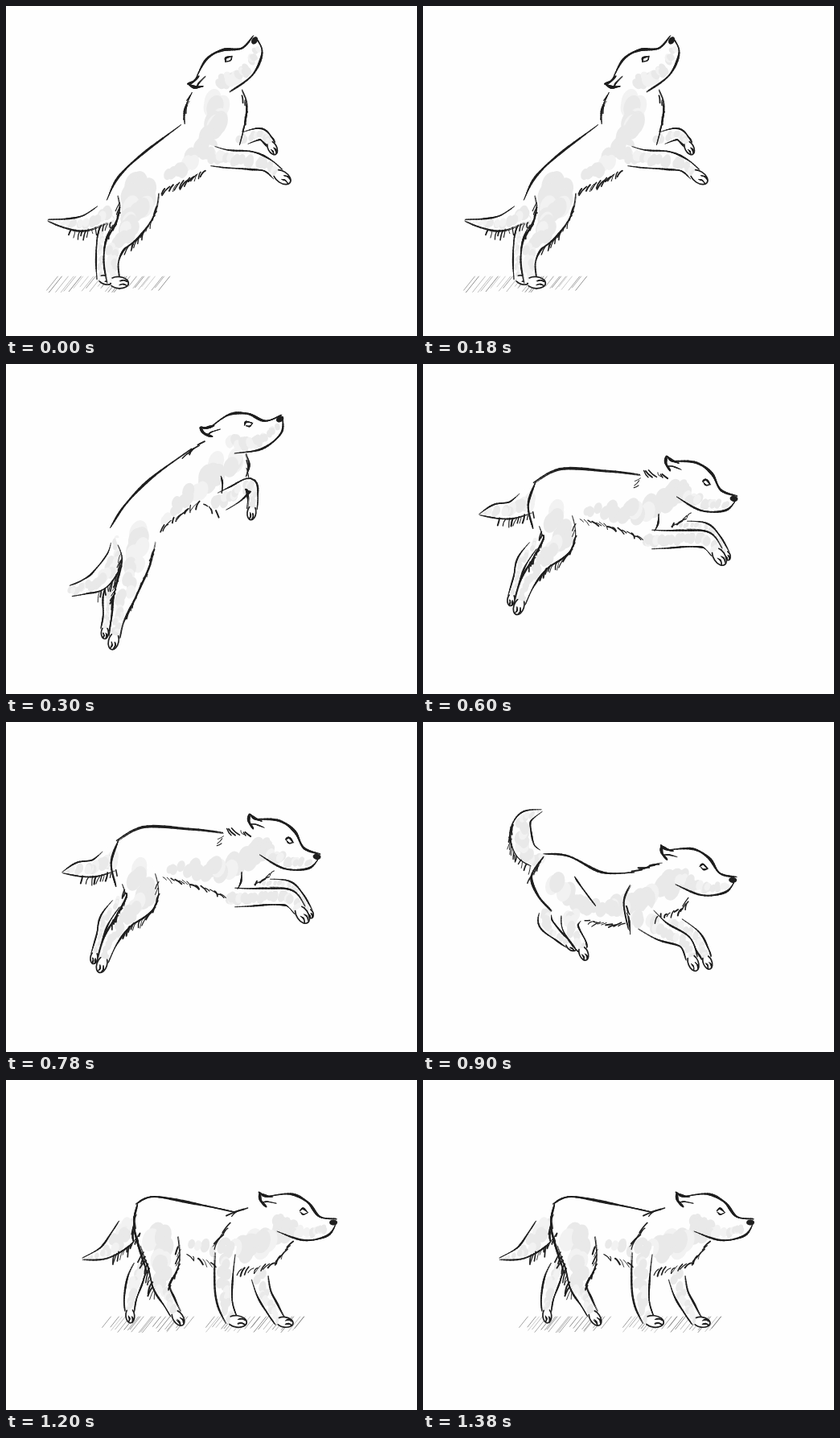
Recreate the animation shown at these times as an HTML page with a canvas. Size 511x410 px, loop 1.5 s.

```html
<!DOCTYPE html>
<html lang="en">
<head>
<meta charset="utf-8">
<title>Leaping wolf</title>
<style>
html, body { margin: 0; width: 100%; height: 100%; overflow: hidden; background: #fefefe; }
canvas { display: block; }
</style>
</head>
<body>
<canvas id="stage" width="511" height="410"></canvas>
<script>
const ctx = document.getElementById('stage').getContext('2d');
const INK = '#1f1f1f', PAPER = '#fefefe', HOLD = 300;

let seed = 1;
const rand = () => (seed = seed * 16807 % 2147483647) / 2147483647;
const jitter = a => (rand() * 2 - 1) * a;

// Smooth curve through "x,y x,y" or, with a half width, "x,y,r x,y,r"
function curve(text) {
  const p = text.split(' ').map(q => q.split(',').map(Number));
  const at = i => p[Math.max(0, Math.min(p.length - 1, i))];
  const out = [];
  for (let i = 0; i < p.length - 1; i++) {
    for (let t = 0; t < 1; t += 0.125) {
      out.push(p[0].map((_, c) => {
        const [a, b, d, e] = [at(i - 1)[c], at(i)[c], at(i + 1)[c], at(i + 2)[c]];
        return b + t * (d - a + t * (2 * a - 5 * b + 4 * d - e + t * (3 * b - a - 3 * d + e))) / 2;
      }));
    }
  }
  return [...out, at(p.length)];
}

const part = (p, from, to) => p.slice(Math.floor(p.length * from), Math.ceil(p.length * to));

// Two uneven passes of a brush that thins out at both ends
function ink(width, p) {
  ctx.strokeStyle = INK;
  for (const share of [0.85, 0.45]) {
    const ox = jitter(0.7), oy = jitter(0.7), wave = rand() * 6;
    for (let i = 1; i < p.length; i++) {
      const press = 0.35 + 0.65 * Math.sin(Math.PI * i / p.length);
      ctx.lineWidth = width * share * press * (1 + 0.25 * Math.sin(i * 0.6 + wave));
      ctx.beginPath();
      ctx.moveTo(p[i - 1][0] + ox, p[i - 1][1] + oy);
      ctx.lineTo(p[i][0] + ox, p[i][1] + oy);
      ctx.stroke();
    }
  }
}

// Loose hairs along a curve, all leaning by (dx, dy)
function fur(p, dx, dy) {
  let gap = 0;
  for (let i = 1; i < p.length; i++) {
    const [x, y] = p[i];
    gap += Math.hypot(x - p[i - 1][0], y - p[i - 1][1]);
    if (gap < 3.5) continue;
    gap = 0;
    const k = 0.6 + rand() * 0.7, ex = x + dx * k + jitter(2), ey = y + dy * k + jitter(2);
    ctx.lineWidth = 0.8 + rand() * 1.3;
    ctx.strokeStyle = INK;
    ctx.beginPath();
    ctx.moveTo(x + jitter(1.5), y + jitter(1.5));
    ctx.quadraticCurveTo(x + dx * k * 0.6, y + dy * k * 0.3, ex, ey);
    ctx.stroke();
  }
}

// Patchy grey dabs inside a shape given by its centre line and half width
function wash(p) {
  for (const [x, y, r] of p) {
    ctx.fillStyle = rand() < 0.7 ? '#e9e9e9' : '#f2f2f2';
    ctx.beginPath();
    ctx.ellipse(x + jitter(r * 0.45), y + jitter(r * 0.3), r * 0.42, r * 0.6, 0.3, 0, 7);
    ctx.fill();
  }
}

// Outlines of a centre line on both sides
function sides(p) {
  return [1, -1].map(s => p.map(([x, y, r], i) => {
    const a = p[Math.max(0, i - 1)], b = p[Math.min(p.length - 1, i + 1)];
    const dir = Math.atan2(b[1] - a[1], b[0] - a[0]);
    return [x - s * r * Math.sin(dir), y + s * r * Math.cos(dir)];
  }));
}

function shape(p, width) {
  const [left, right] = sides(p);
  ctx.fillStyle = PAPER;
  ctx.beginPath();
  [...left, ...right.slice().reverse()].forEach(q => ctx.lineTo(q[0], q[1]));
  ctx.fill();
  wash(p);
  for (const side of [left, right]) ink(width, part(side, 0.12, 1));
  return [left, right];
}

function paw([x, y, r], angle) {
  ctx.save();
  ctx.translate(x, y);
  ctx.rotate(angle);
  ctx.fillStyle = PAPER;
  ctx.beginPath();
  ctx.ellipse(r * 0.8, 0, r * 1.5, r * 0.9, 0, -2.4, 2.4);
  ctx.fill();
  ctx.strokeStyle = INK;
  ctx.lineWidth = 1.7;
  ctx.stroke();
  for (const s of [-0.3, 0.35]) ink(1.7, curve([0.9, s, 1.5, s - 0.2, 2.1, s].map(v => v * r).join().replace(/(,[^,]+),/g, '$1 ')));
  ctx.restore();
}

function limb([line, angle]) {
  const p = curve(line), outline = shape(p, 2.3);
  if (p[0][2] > 18) for (const side of outline) fur(part(side, 0.15, 0.55), -4, 10);
  paw(p[p.length - 1], angle);
}

function tail(line) {
  const [, lower] = shape(curve(line), 2.1);
  fur(part(lower, 0, 0.6), -2, 10);
}

// The head in its own space: the ear tip is the origin
function head(x, y, degrees) {
  ctx.save();
  ctx.translate(x, y);
  ctx.rotate(degrees * Math.PI / 180);
  wash(curve('24,34,12 42,46,12 62,49,9 84,45,7'));
  ink(4, curve('0,0 1,9 8,17'));
  ink(3.4, curve('0,0 6,4 16,6'));
  ink(3.5, curve('11,5 39,2 60,12 75,30 96,33'));
  ink(2.8, curve('96,36 85,53 55,59 22,48'));
  ink(1.6, curve('3,12 10,11 21,13'));
  ink(2.4, curve('50,23 54,20 60,25'));
  ink(1.6, curve('51,24 55,27 60,25'));
  ctx.fillStyle = INK;
  ctx.beginPath();
  ctx.ellipse(92, 37, 5, 3.6, 0, 0, 7);
  ctx.fill();
  ctx.restore();
}

function ground(x0, x1, y) {
  for (let x = x0; x < x1; x += 5) {
    const a = x + jitter(3), h = 12 + rand() * 8;
    ctx.strokeStyle = `rgba(0, 0, 0, ${0.2 + rand() * 0.3})`;
    ctx.lineWidth = 0.9;
    ctx.beginPath();
    ctx.moveTo(a + 15, y);
    ctx.lineTo(a + 15 - h * 0.8, y + h);
    ctx.stroke();
  }
}

// Limbs: centre line and paw angle. Hair: curve and lean.
const poses = [
  { // rearing up
    head: [226, 97, -55],
    body: '265,122,24 262,152,24 235,188,18 205,212,12',
    back: ['218,148 170,184 140,213 126,241'],
    lines: ['231,107 222,128 222,146', '293,104 299,122 296,148 290,172'],
    tail: '128,254,13 100,269,10 75,270,6 52,266,1',
    far: [['290,167,8 315,159,7 326,167,6 329,172,6', 1.1], ['130,262,8 120,285,6 117,315,5 119,339,6', 0.3]],
    near: [['164,222,27 164,250,23 152,277,17 137,295,13 131,318,9 134,343,8', 0.1],
      ['250,185,13 275,190,11 305,192,11 325,198,8 338,209,8', 0.6]],
    hair: [['192,229 225,216 249,203', -6, 9], ['292,106 299,124 295,150', 0, 9], ['231,107 225,128', -4, 9]],
    ground: [[52, 192, 336]]
  },
  { // taking off
    head: [242, 79, -28],
    body: '280,118,20 255,140,24 225,168,15 195,192,10',
    back: ['231,105 180,142 148,175 130,203'],
    lines: ['267,139 269,148 268,160', '298,112 302,126 298,140'],
    tail: '138,215,6 136,240,11 118,267,13 98,277,9 81,282,7',
    far: [['136,268,8 127,288,6 126,312,5 123,330,5', 1.6]],
    near: [['162,215,26 162,245,18 147,290,13 139,318,8 135,339,7', 1.8],
      ['262,174,12 284,162,11 303,150,8 307,165,6 306,180,6', 1.7]],
    hair: [['191,205 221,183 242,170', -5, 9], ['242,170 262,184', 4, 8], ['299,114 300,130', 1, 11],
      ['224,114 246,97', -8, 6]]
  },
  { // in the air
    head: [303, 114, 10.7],
    body: '318,160,20 285,180,22 245,183,18 200,182,9',
    back: ['270,138 227,133 170,131 138,148', '140,147 131,175 137,204'],
    lines: ['293,186 292,198 288,207'],
    tail: '134,169,16 112,181,11 90,183,9 70,187,1',
    far: [['143,218,6 124,243,7 117,265,5 110,289,5', 1.7], ['318,200,5 350,202,5 366,216,4 377,235,4', 1.2]],
    near: [['162,185,22 169,218,20 147,246,11 131,270,9 121,296,7', 1.9],
      ['278,218,12 300,218,11 330,217,10 352,219,10 365,234,8', 1]],
    hair: [['189,192 225,199 268,214', 6, 5], ['335,180 328,190 312,200', -7, 7], ['262,160 264,145', 5, -6],
      ['273,139 306,141', -6, -6]]
  },
  { // coming down
    head: [296, 153, 4],
    body: '322,195,20 285,215,24 245,228,18 205,230,16 165,205,22',
    back: ['150,164 181,167 222,187 262,187', '150,168 135,192 144,217 160,235'],
    lines: ['188,192 196,204 214,228', '258,203 250,225 256,258'],
    tail: '146,172,11 128,160,13 122,138,13 128,119,8 148,110,1',
    far: [['153,234,7 153,250,9 170,267,6 181,276,5', 0.7], ['308,247,9 336,266,8 348,285,7 352,294,6', 1.2]],
    near: [['185,240,14 183,255,10 195,276,8 198,283,6', 1.2],
      ['270,240,16 295,259,12 325,273,8 334,294,7', 1.2]],
    hair: [['203,245 231,251 253,250', -8, 3], ['331,215 325,229 290,241', -5, 8], ['252,222 257,254', 2, 10],
      ['264,187 301,173', -11, 2], ['150,170 135,192', -6, 8]]
  },
  { // standing
    head: [315, 140, 0],
    body: '348,183,18 315,204,25 280,210,20 235,205,10',
    back: ['162,154 185,145 242,155 284,164', '163,155 159,185 175,240'],
    lines: [],
    tail: '156,178,15 143,196,14 122,214,8 95,222,1',
    far: [['169,225,7 162,245,10 155,270,8 154,288,6', 1.5], ['314,238,11 320,263,9 331,284,8 341,300,7', 0.15]],
    near: [['188,190,25 195,225,21 193,255,11 203,276,8 211,291,7', 1],
      ['274,205,13 271,240,12 272,275,10 281,299,8', 0.15]],
    hair: [['218,214 257,227', 6, 7], ['358,198 345,216 326,229 290,235', -6, 8], ['306,157 284,165', -10, 5],
      ['285,171 262,205', -8, 10], ['162,160 157,190', -1, 12]],
    ground: [[118, 220, 294], [243, 362, 294]]
  }
];

function draw(pose) {
  ctx.fillStyle = PAPER;
  ctx.fillRect(0, 0, 511, 410);
  for (const g of pose.ground || []) ground(...g);
  pose.far.forEach(limb);
  tail(pose.tail);
  wash(curve(pose.body));
  pose.near.forEach(limb);
  for (const line of pose.back) ink(3.2, curve(line));
  for (const line of pose.lines) ink(2.2, curve(line));
  for (const [line, dx, dy] of pose.hair) fur(curve(line), dx, dy);
  head(...pose.head);
}

let shown = -1;
ctx.lineCap = ctx.lineJoin = 'round';

function tick() {
  const i = Math.floor(performance.now() / HOLD) % poses.length;
  if (i !== shown) {
    shown = i;
    seed = 7919 + i;
    draw(poses[i]);
  }
  requestAnimationFrame(tick);
}
tick();
</script>
</body>
</html>
```
